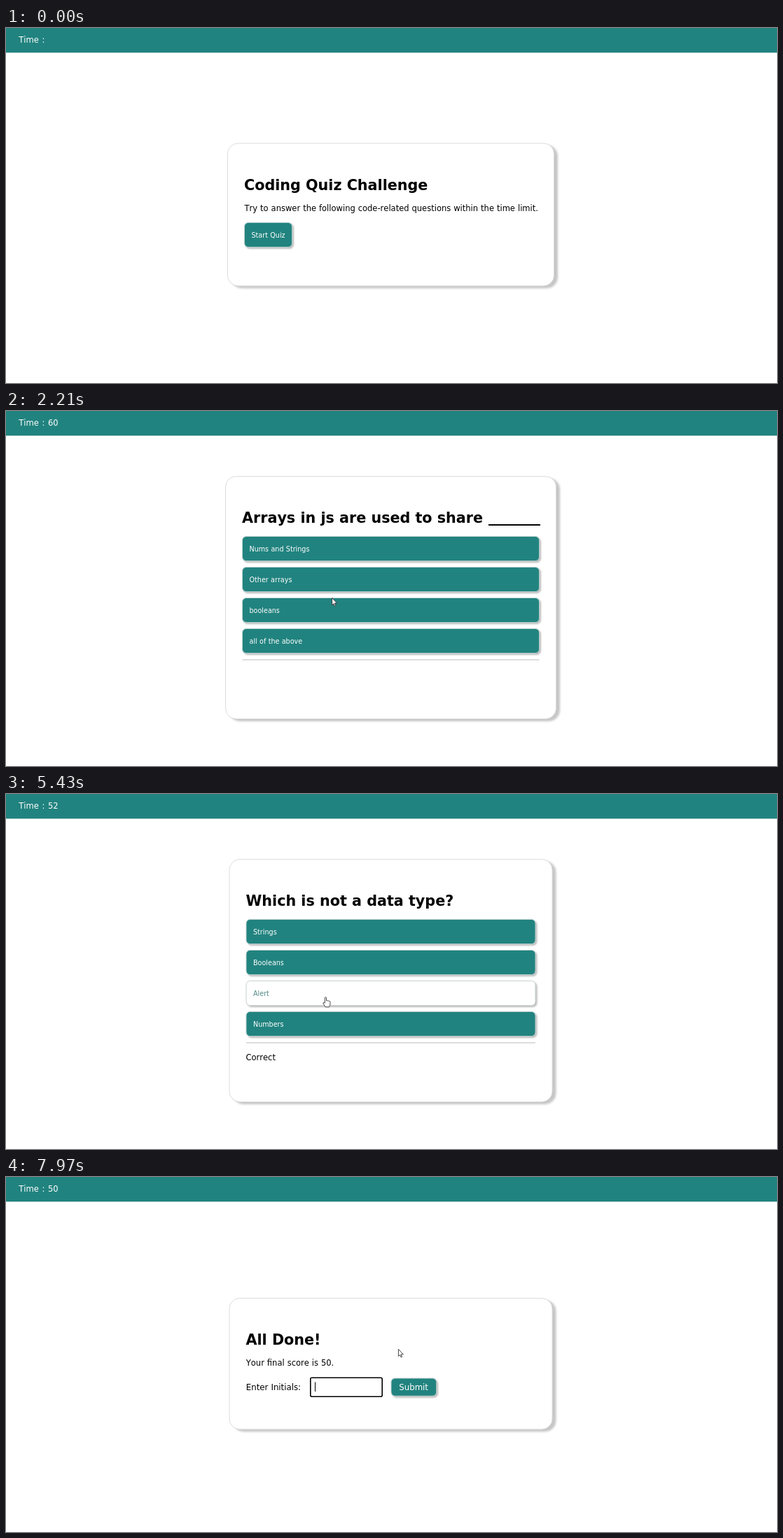
An HTML page that plays this animation: 1101 px wide and 508 px high, repeating every 8000 ms.

```html
<!DOCTYPE html>
<html lang="en">
<head>
<meta charset="utf-8">
<title>Coding quiz</title>
<style>
  html, body { margin: 0; width: 100%; height: 100%; overflow: hidden; background: #fff; }
  svg { display: block; width: 100%; height: 100%; }
  text { font-family: "DejaVu Sans", Verdana, sans-serif; font-kerning: none; word-spacing: .03em; white-space: pre; }
  .heading { font-size: 20.7px; font-weight: bold; word-spacing: 0; }
  .body { font-size: 11.5px; }
  .wide { font-size: 11.75px; }
  .small { font-size: 9.6px; }
  .timer { font-size: 11.5px; fill: #fff; word-spacing: 1px; }
  .card { fill: #fff; stroke: #dcdcdc; filter: drop-shadow(5.5px 3.5px 1.7px #c6c6c6); }
  .button rect { fill: #21837f; stroke: #b9cfce; filter: drop-shadow(2px 2px 1.3px #bdbdbd); }
  .button text { fill: #fff; }
  .button.hover rect { fill: #fff; stroke: #c8d0d0; }
  .button.hover text { fill: #4d8a85; }
  .cursor { fill: #fff; stroke: #333; stroke-width: .9; stroke-linejoin: round; }
  .click { fill: #fdf65f; mix-blend-mode: multiply; }
</style>
</head>
<body>
<svg id="stage" viewBox="0 0 1101 508" preserveAspectRatio="none"></svg>
<script>
const LOOP = 8000;
const CENTER = 550;
const PADDING = 24;
const stage = document.getElementById('stage');

function add(parent, tag, attrs, content) {
  const node = document.createElementNS('http://www.w3.org/2000/svg', tag);
  for (const name in attrs) node.setAttribute(name, attrs[name]);
  if (content) node.textContent = content;
  return parent.appendChild(node);
}
const show = (node, visible) => node.setAttribute('display', visible ? 'inline' : 'none');
const label = (parent, x, y, content, style) => add(parent, 'text', { x, y, class: style }, content);

function makeScreen(width, y, height, title) {
  const group = add(stage, 'g', {});
  const x = CENTER - width / 2 - .5;
  const left = x + PADDING;
  add(group, 'rect', { x, y, width, height, rx: 15, class: 'card' });
  label(group, left - .5, y + 66.5, title, 'heading');
  return { group, left, inner: width - 2 * PADDING, buttons: [] };
}

function addButton(screen, box, content, style, inset) {
  const node = add(screen.group, 'g', { class: 'button' });
  add(node, 'rect', { ...box, rx: 5.5 });
  label(node, box.x + inset, box.y + box.height / 2 + 4, content, style);
  screen.buttons.push({ node, box });
}

function makeQuestion(width, title, answers) {
  const screen = makeScreen(width, 93.5, 347, title);
  const { group, left, inner } = screen;
  answers.forEach((answer, i) =>
    addButton(screen, { x: left, y: 179.5 + 44 * i, width: inner, height: 35 }, answer, 'small', 10));
  add(group, 'rect', { x: left, y: 355.5, width: inner, height: 1, fill: '#bcbcbc' });
  screen.feedback = label(group, left - .5, 380.5, '', 'body');
  return screen;
}

add(stage, 'rect', { width: 1101, height: 35.3, fill: '#21837f' });
const timer = label(stage, 18.3, 21.3, 'Time :', 'timer');

const intro = makeScreen(466, 165, 204, 'Coding Quiz Challenge');
label(intro.group, 340.5, 262, 'Try to answer the following code-related questions within the time limit.', 'body');
addButton(intro, { x: intro.left, y: 278.5, width: 68, height: 35 }, 'Start Quiz', 'small', 10);

const first = makeQuestion(472, 'Arrays in js are used to share',
  ['Nums and Strings', 'Other arrays', 'booleans', 'all of the above']);
add(first.group, 'rect', { x: 689, y: 162, width: 74, height: 2 });

const second = makeQuestion(461, 'Which is not a data type?',
  ['Strings', 'Booleans', 'Alert', 'Numbers']);
second.feedback.textContent = 'Correct';

const done = makeScreen(461, 173.5, 187.5, 'All Done!');
label(done.group, 342.8, 270, 'Your final score is 50.', 'body');
label(done.group, 342.8, 304.7, 'Enter Initials:', 'wide');
const input = { x: 434.8, y: 287.2, width: 102.4, height: 27 };
const field = add(done.group, 'rect', { ...input, rx: 2, fill: '#fff' });
const caret = add(done.group, 'rect', { x: 441, y: 293.5, width: 1, height: 13.5 });
addButton(done, { x: 550, y: 288, width: 64.7, height: 25.3 }, 'Submit', 'wide', 11.3);

const cursors = {
  hand: 'M-1.1 8.4V1a1.1 1.1 0 0 1 2.2 0V5q1-.6 2 .2q1-.4 2 .4q1.1-.2 1.4 .9V9.5Q6.4 12 5 14H-.2Q-1.5 12-3.3 9.2Q-4 7.6-2.7 7.4Q-2 7.3-1.1 8.4Z',
  arrow: 'M.4 .4V10.6L2.6 8.5L4.1 12L5.6 11.3L4.1 7.9H7.3Z',
  beam: 'M-2-6H2M0-6V6M-2 6H2'
};
const pointer = add(stage, 'path', { class: 'cursor' });
const highlight = add(stage, 'circle', { r: 9, class: 'click' });

// Each move eases to its end point; some are followed by a click
const entry = { x: 1034, y: 497 };
const moves = [
  { start: 380, end: 1160, x: 388.5, y: 298.5, click: 1490 },
  { start: 1660, end: 1810, x: 403, y: 309 },
  { start: 1810, end: 1960, x: 446, y: 315 },
  { start: 1960, end: 2500, x: 489, y: 208 },
  { start: 2500, end: 2770, x: 478.5, y: 234.5 },
  { start: 3250, end: 3480, x: 474, y: 280, click: 3880 },
  { start: 4430, end: 4590, x: 473, y: 322, click: 4950 },
  { start: 5290, end: 5730, x: 404.5, y: 193 },
  { start: 6020, end: 6460, x: 407, y: 278, click: 6690 },
  { start: 7300, end: 7530, x: 443, y: 306, click: 7530 },
  { start: 7680, end: 7840, x: 602, y: 262 },
  { start: 7840, end: 7970, x: 560, y: 246 }
];
const HOLD = 100;
const clicks = moves.filter(move => move.click).map(move => move.click);
const screens = [intro, first, first, second, done, done];

function pointerAt(t) {
  let { x, y } = entry;
  for (const move of moves) {
    const u = Math.min(1, Math.max(0, (t - move.start) / (move.end - move.start)));
    const eased = u * u * (3 - 2 * u);
    x += (move.x - x) * eased;
    y += (move.y - y) * eased;
  }
  return [x, y];
}

// The wrong answer costs five seconds at the third tick; the clock stops after five
function timeLeft(t) {
  if (t < clicks[0]) return '';
  const ticks = Math.min(5, Math.floor((t - clicks[0]) / 993));
  return 60 - ticks - (ticks >= 3 ? 5 : 0);
}

const inside = (box, x, y) => x >= box.x && x <= box.x + box.width && y >= box.y && y <= box.y + box.height;

function draw(t) {
  const pressed = clicks.filter(time => t >= time).length;
  const released = clicks.filter(time => t >= time + HOLD).length;
  const screen = screens[released];
  const [x, y] = pointerAt(t);
  const present = t >= moves[0].start;
  let shape = 'arrow';

  for (const other of screens) show(other.group, other === screen);
  for (const { node, box } of screen.buttons) {
    const over = present && inside(box, x, y);
    node.classList.toggle('hover', over);
    if (over) shape = 'hand';
  }
  if (screen === done && inside(input, x, y)) shape = 'beam';

  timer.textContent = 'Time : ' + timeLeft(t);
  first.feedback.textContent = released > 1 ? 'Incorrect' : '';
  const focused = pressed === clicks.length;
  field.setAttribute('stroke', focused ? '#000' : '#888');
  field.setAttribute('stroke-width', focused ? 1.6 : 1);
  show(caret, focused);

  const place = `translate(${x.toFixed(2)} ${y.toFixed(2)})`;
  pointer.setAttribute('d', cursors[shape]);
  pointer.setAttribute('transform', place);
  highlight.setAttribute('transform', place);
  show(pointer, present);
  show(highlight, pressed > released);
}

const began = performance.now();
function tick() {
  draw((performance.now() - began) % LOOP);
  requestAnimationFrame(tick);
}
tick();
</script>
</body>
</html>
```
